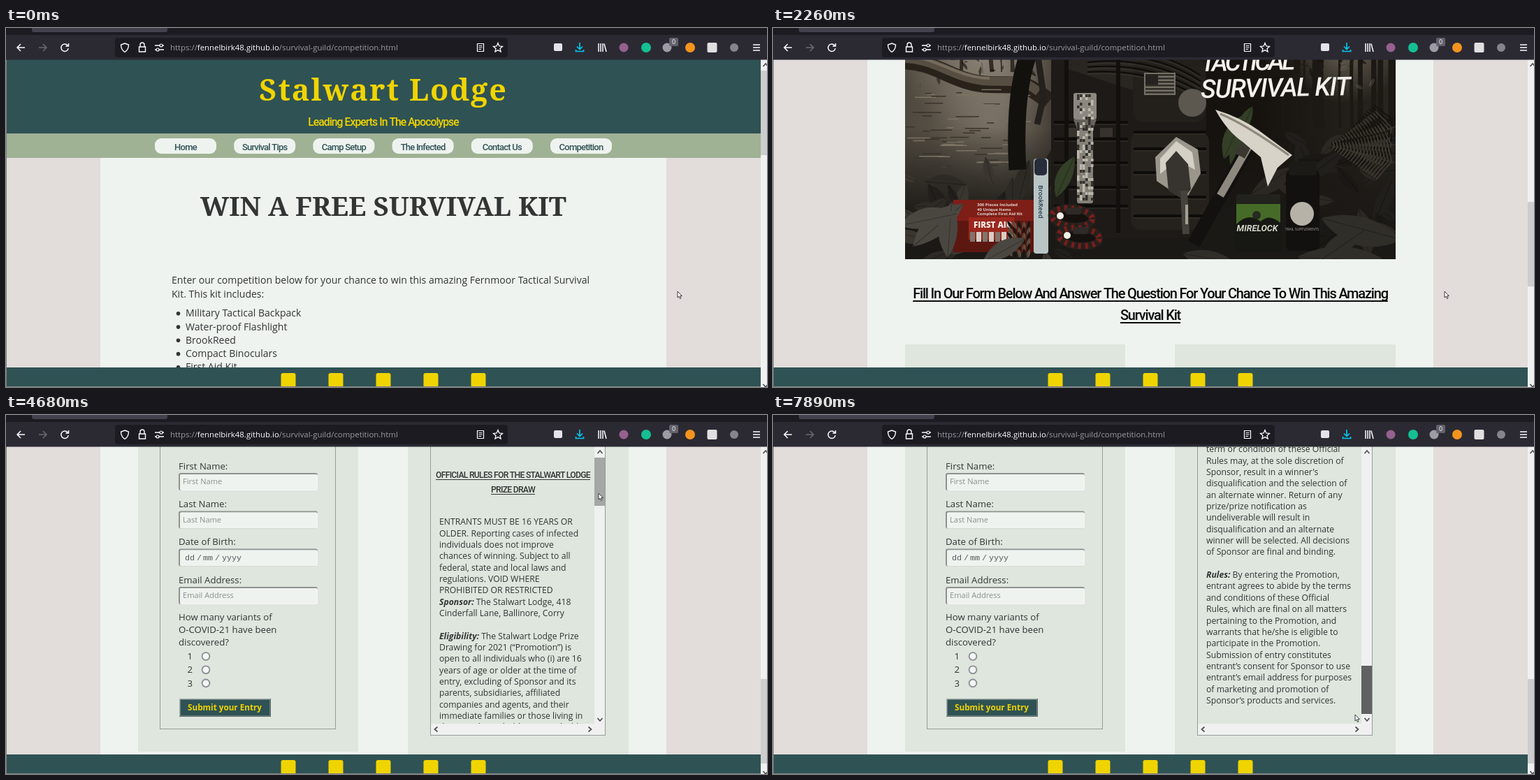
An HTML page with a canvas that plays this animation: 1089x514 px, repeating every 8000 ms.

```html
<!DOCTYPE html>
<html lang="en">
<head>
<meta charset="utf-8">
<title>Competition page</title>
<style>
html, body { margin: 0; width: 100%; height: 100%; overflow: hidden; background: #eef3f0; }
canvas { display: block; width: 1089px; height: 514px; }
</style>
</head>
<body>
<canvas id="stage" width="1089" height="514"></canvas>
<script>
const ctx = document.getElementById('stage').getContext('2d');
const LOOP = 8000, MAX_SCROLL = 1125;
const TEAL = '#2f5254', GOLD = '#f0d400', PAPER = '#eef3f0', CARD = '#dee6dd', INK = '#323534';
const SANS = '"Open Sans", "Noto Sans", sans-serif';
const NARROW = 'Roboto, "Liberation Sans", sans-serif';
const SLAB = '"Noto Serif", "Liberation Serif", serif';
const MONO = '"Liberation Mono", monospace';

const TICKS = [0, 1010, 1130, 1250, 1370, 1490, 1610, 1730, 2010, 2130, 2260, 2400, 2550, 2700, 2820,
  2940, 3090, 3210, 3360, 3760, 3900, 4020, 4170, 4290, 4410, 4530, 4680, 4960, 5240, 5530, 5660, 5790,
  5940, 6070, 6200, 6330, 6460, 6590, 6720, 6850, 6980, 7110, 7240, 7370, 7500, 7630, 7760, 7890];
const SCROLL = [[900, 0], [1490, 336], [1610, 384], [1730, 400], [2010, 458], [2260, 667], [2940, 1070],
  [3090, 1101], [3210, 1116], [3360, MAX_SCROLL]];
const THUMB = [[5400, 0], [5530, 6], [5790, 24], [6720, 156], [7630, 298]];
const POINTER = [[3360, 961, 377], [3760, 949, 327], [4020, 851, 163], [4290, 838, 112], [4530, 848, 112],
  [4960, 847, 111], [5240, 848, 112], [5530, 849, 118], [5790, 852, 138], [6720, 847, 281],
  [7630, 833, 417], [7890, 833, 429]];

function at(track, t, i = 1) {
  if (t <= track[0][0]) return track[0][i];
  for (let k = 1; k < track.length; k++) {
    const a = track[k - 1], b = track[k];
    if (t <= b[0]) return a[i] + (b[i] - a[i]) * (t - a[0]) / (b[0] - a[0]);
  }
  return track[track.length - 1][i];
}

function rect(x, y, w, h, color, r = 0) {
  ctx.fillStyle = color;
  ctx.beginPath();
  ctx.roundRect(x, y, w, h, r);
  ctx.fill();
}
function dot(x, y, r, color) {
  ctx.fillStyle = color;
  ctx.beginPath();
  ctx.arc(x, y, r, 0, 7);
  ctx.fill();
}
function fill(d, color) {
  ctx.fillStyle = color;
  ctx.fill(new Path2D(d));
}
function line(d, color, w = 1.4) {
  ctx.strokeStyle = color;
  ctx.lineWidth = w;
  ctx.stroke(new Path2D(d));
}
// y is the middle of the capitals; returns the advance width
function text(s, x, y, size, color, o = {}) {
  ctx.font = `${o.style || ''} ${o.weight || 400} ${size}px ${o.family || SANS}`;
  ctx.letterSpacing = (o.spacing || 0) * size + 'px';
  ctx.textAlign = o.align || 'left';
  ctx.fillStyle = color;
  ctx.fillText(s, x, y + size * 0.36);
  return ctx.measureText(s).width;
}
function narrow(s, x, y, size, color, underline) {
  const w = text(s, x, y, size, color, { family: NARROW, weight: 500, spacing: -0.06, align: 'center' });
  if (underline) rect(x - w / 2, Math.round(y + size * 0.5), w, underline, color);
}
function chevron(x, y, dx, dy, color = '#505050') {
  const s = 3.5;
  line(`M${x - dy * s - dx * 2} ${y - dx * s - dy * 2} L${x + dx * 2} ${y + dy * 2} ` +
    `L${x + dy * s - dx * 2} ${y + dx * s - dy * 2}`, color, 1.7);
}
// Runs draw with the origin moved and turned
function placed(x, y, turn, draw) {
  ctx.save();
  ctx.translate(x, y);
  ctx.rotate(turn);
  draw();
  ctx.restore();
}
function inside(x, y, w, h, draw) {
  ctx.save();
  ctx.beginPath();
  ctx.rect(x, y, w, h);
  ctx.clip();
  draw();
  ctx.restore();
}
function seeded(n) {
  return () => (n = (n * 16807) % 2147483647) / 2147483647;
}

function toolbar() {
  const pale = '#fbfbfe', dim = '#6a6973';
  rect(0, 0, 1089, 10, '#1c1b22');
  rect(37, -4, 194, 10, '#42414d', 3);
  rect(0, 10, 1089, 35, '#2b2a33');
  rect(0, 45, 1089, 1, 'rgba(43,42,51,.5)');
  rect(156, 14, 562, 28, '#1c1b22', 4);
  line('M27 28H16M21 23L16 28L21 33', pale, 1.5);
  line('M47 28H58M53 23L58 28L53 33', dim, 1.5);
  line('M88.5 25.5A5.2 5.2 0 1 0 89.2 29M89.5 22V26H85.5', pale, 1.5);
  line('M170 22L175.5 24C175.5 29 174 32 170 34.5C166 32 164.5 29 164.5 24Z', pale);
  line('M190.5 27H199.5V34H190.5ZM192 27V24A3 3 0 0 1 198 24V27', pale);
  line('M213 25H220M224 25H226M213 31H215M219 31H226', pale);
  line('M220 25a2 2 0 1 0 4 0a2 2 0 1 0-4 0M215 31a2 2 0 1 0 4 0a2 2 0 1 0-4 0', pale, 1.2);
  let x = 235;
  for (const [s, c] of [['https://', '#9b9aa3'], ['fennelbirk48.github.io', pale],
    ['/survival-guild/competition.html', '#9b9aa3']]) x += text(s, x, 28, 11.4, c);
  line('M674.5 22.5H683.5V33.5H674.5ZM676.5 25.5H681.5M676.5 28H681.5M676.5 30.5H680', pale, 1.2);
  line('M704 21.5L705.9 26L710.5 26.4L707 29.5L708.1 34L704 31.6L699.9 34L701 29.5L697.5 26.4L702.1 26Z', pale, 1.3);
  rect(784, 22, 12, 11, '#e4e3ea', 2);
  line('M821 21V30M817 26.5L821 30.5L825 26.5M815.5 31V33.5H826.5V31', '#00c8ee', 1.7);
  line('M848 22V34M851 22V34M854 22V34M856 22.5L859 34', pale, 1.5);
  dot(884, 28, 6.5, '#96608f');
  dot(916, 28, 7, '#15bf93');
  dot(946, 28, 6.5, '#9d9ca5');
  rect(949, 14, 13, 12, '#62616c', 2);
  text('0', 955.5, 20, 9, '#fff', { align: 'center' });
  dot(979, 28, 7, '#f4941f');
  rect(1003.5, 21, 14, 14, '#e2dfe0', 2);
  dot(1042, 28, 6, '#85848c');
  line('M1069 24H1079M1069 28H1079M1069 32H1079', pale, 1.4);
}

function header() {
  rect(0, 45, 1080, 106, TEAL);
  text('Stalwart Lodge', 540, 89, 43, GOLD, { family: SLAB, weight: 700, spacing: 0.045, align: 'center' });
  narrow('Leading Experts In The Apocolypse', 540, 134, 15.7, GOLD);
  rect(0, 151, 1080, 35, '#9fb294');
  ['Home', 'Survival Tips', 'Camp Setup', 'The Infected', 'Contact Us', 'Competition'].forEach((s, i) => {
    const x = 213 + i * 113.2;
    rect(x, 158, 88, 22, PAPER, 9);
    narrow(s, x + 44, 170, 13, TEAL);
  });
}

const ITEMS = ['Military Tactical Backpack', 'Water-proof Flashlight', 'BrookReed', 'Compact Binoculars',
  'First Aid Kit', 'Survival Shovel with 32 different tools', 'Survival Axe',
  'Two Paracord Survival Bracelets', 'Canteen', 'Camping Cook Set'];

function intro() {
  text('WIN A FREE SURVIVAL KIT', 540, 255, 38.5, INK, { family: SLAB, weight: 700, align: 'center' });
  text('Enter our competition below for your chance to win this amazing Fernmoor Tactical Survival', 237, 361, 14.05, INK);
  text('Kit. This kit includes:', 237, 380.5, 14.05, INK);
  ITEMS.forEach((s, i) => {
    const y = 408.3 + i * 19.28;
    dot(246.5, y + 0.5, 2.8, INK);
    text(s, 257, y, 14.05, INK);
  });
}

function leaf(x, y, len, turn, color) {
  placed(x, y, turn, () => {
    fill(`M0 0Q${len / 2} ${-len * 0.4} ${len} 0Q${len / 2} ${len * 0.28} 0 0`, color);
    line(`M0 0L${len} 0`, 'rgba(0,0,0,.3)', 1);
  });
}
function fern(x, y, len, turn, color) {
  placed(x, y, turn, () => {
    line(`M0 0H${len}`, color, 1.2);
    for (let i = 6; i < len; i += 5) {
      const h = (len - i) * 0.3 + 3;
      line(`M${i} 0l${h * 0.5} ${-h}M${i} 0l${h * 0.5} ${h}`, color, 1.8);
    }
  });
}
function glow(x, y, r, rgb, alpha) {
  const g = ctx.createRadialGradient(x, y, 5, x, y, r);
  g.addColorStop(0, `rgba(${rgb},${alpha})`);
  g.addColorStop(1, `rgba(${rgb},0)`);
  ctx.fillStyle = g;
  ctx.fillRect(x - r, y - r, r * 2, r * 2);
}

function forest(rnd) {
  const bg = ctx.createLinearGradient(189, 0, 891, 0);
  [[0, '#4f493f'], [0.2, '#625b50'], [0.34, '#38332c'], [0.43, '#13110e'], [0.72, '#16130f'], [1, '#29251f']]
    .forEach(([p, c]) => bg.addColorStop(p, c));
  ctx.fillStyle = bg;
  ctx.fillRect(189, 0, 702, 368);
  glow(300, 70, 120, '166,157,143', 0.6);
  glow(310, 170, 90, '140,131,117', 0.45);
  glow(820, 55, 90, '132,123,108', 0.75);

  // trunks on both sides, then broken foliage
  for (let i = 0; i < 15; i++) {
    const x = 735 + rnd() * 155, lean = rnd() * 24 - 12;
    line(`M${x} -5Q${x + lean} 70 ${x + lean / 2} 180`, '#1c1813', 2 + rnd() * 9);
  }
  for (let i = 0; i < 11; i++) {
    const x = 205 + rnd() * 200;
    line(`M${x} -5L${x + rnd() * 20 - 10} 100`, '#332d26', 1 + rnd() * 5);
  }
  for (let i = 0; i < 320; i++) {
    const right = i % 2, x = right ? 700 + rnd() * 191 : 189 + rnd() * 210;
    const tone = ['rgba(24,21,17,.6)', 'rgba(126,117,103,.35)', 'rgba(42,37,31,.6)'][i % 3];
    leaf(x, rnd() * rnd() * 150, 5 + rnd() * 12, rnd() * 6, tone);
  }
  [[189, 40, 75, 0.15], [195, 15, 95, 0.35], [189, 70, 65, -0.25], [235, 0, 70, 0.9]].forEach(a => fern(...a, '#857c6d'));
  line('M183 84C235 84 260 117 310 118S360 114 395 142', '#28221b', 24);
  line('M183 80C235 80 260 112 310 113S355 110 380 128', '#574e42', 13);
  line('M183 77C235 77 260 108 310 109', '#776c5d', 4);

  const ground = ctx.createLinearGradient(0, 180, 0, 310);
  ground.addColorStop(0, 'rgba(24,22,18,0)');
  ground.addColorStop(1, '#1b1916');
  ctx.fillStyle = ground;
  ctx.fillRect(189, 180, 702, 188);
  for (let i = 0; i < 60; i++)
    line(`M${189 + rnd() * 150} ${125 + rnd() * 110}h${8 + rnd() * 30}`, ['#39332b', '#7b7263'][i % 2], 1.5);
  for (let i = 0; i < 34; i++) leaf(185 + rnd() * 230, 255 + rnd() * 105, 25 + rnd() * 45, rnd() * 6, ['#2d2a25', '#3a362f', '#211f1b'][i % 3]);
  for (let i = 0; i < 34; i++) leaf(725 + rnd() * 170, 180 + rnd() * 180, 30 + rnd() * 50, rnd() * 6, ['#211f1b', '#1a1815', '#2b2823'][i % 3]);
  for (let i = 0; i < 6; i++) fern(891, 165 + i * 13, 95, 2.7 + i * 0.14, i % 2 ? '#3d382f' : '#14120f');
}

function backpack() {
  line('M350 240C345 150 355 70 385 45Q410 28 440 50', '#12110e', 25);
  line('M480 55Q500 18 545 35L560 60', '#151310', 9);
  line('M378 70L388 140M386 140L378 175', '#24211d', 9);
  rect(398, 52, 222, 286, '#1d1a17', 34);
  fill('M430 60Q500 25 590 65L618 130V160L420 95Z', '#292520');
  rect(515, 82, 104, 90, '#23201b', 16);
  rect(512, 186, 112, 140, '#25221d', 14);
  for (let i = 0; i < 5; i++) {
    line(`M450 ${72 + i * 7}Q540 ${58 + i * 9} 612 ${105 + i * 8}`, '#0c0b09', 2);
    line(`M450 ${75 + i * 7}Q540 ${61 + i * 9} 612 ${108 + i * 8}`, '#3b362e', 1);
  }
  for (const y of [172, 196, 230, 265, 292]) {
    line(`M402 ${y}H508M516 ${y + 14}H620`, '#0d0c0a', 4);
    line(`M402 ${y + 3}H508M516 ${y + 17}H620`, '#38332c', 1);
  }
  rect(420, 180, 18, 13, '#37332c');
  rect(468, 180, 18, 13, '#37332c');
  line('M420 52V330M494 60V330', '#11100d', 6);
  rect(531, 101, 45, 32, '#756f65');
  for (let i = 0; i < 6; i++) rect(533, 103 + i * 5, 41, 2.4, '#2f2c28');
  rect(533, 103, 18, 15, '#25221f');
  dot(600, 144, 20, '#5c5850');
}

// Artwork of the kit, y from 0 to 368
function banner() {
  const rnd = seeded(77);
  forest(rnd);
  backpack();

  // grass, torch
  for (const [x, y, l] of [[645, 225, 70], [655, 235, 55], [405, 280, 65], [668, 190, 45]]) leaf(x, y, l, -1.15, '#333f27');
  rect(430, 130, 33, 38, '#8c887f', 3);
  fill('M430 168H463L457 184H436Z', '#67635b');
  rect(435, 182, 23, 106, '#858178', 3);
  for (let i = 0; i < 150; i++) rect(435 + Math.floor(rnd() * 6) * 4, 132 + Math.floor(rnd() * 38) * 4, 3.5, 4, i % 2 ? '#35322d' : '#bdb8ae');

  // shovel, axe
  fill('M577 193L608 211L612 245L594 277H580L549 256L547 222Z', '#9b968b');
  fill('M577 199L600 215L604 240L578 226L554 246L554 224Z', '#d4d0c6');
  fill('M577 213L594 232L598 268L586 282L566 270L562 230Z', '#37342f');
  line('M588 270L591 332', '#45423c', 10);
  line('M592 290V318', '#a49f94', 4);
  line('M692 186L602 346', '#12110f', 19);
  line('M682 204L640 277', '#8e897f', 11);
  line('M690 180L668 220', '#3a3731', 16);
  fill('M633 154Q670 165 697 185L743 219L722 237L708 264L698 222L672 200Q650 185 633 154Z', '#d8d3c9');
  line('M640 160Q675 174 738 219', '#8d877c', 3);

  // first aid box, straw, pine cone
  rect(258, 283, 115, 75, '#5d1711');
  rect(258, 283, 115, 30, '#7d1e17');
  ['300 Pieces Included', '40 Unique Items', 'Complete First Aid Kit'].forEach((s, i) =>
    text(s, 292, 290 + i * 6.6, 6, '#e4d7cf', { weight: 700 }));
  rect(280, 308, 65, 32, '#9c271e');
  text('FIRST AID', 287, 319, 11.5, '#f2ebe5', { weight: 800 });
  for (let i = 0; i < 7; i++) rect(282 + i * 9, 329, 7, 14, i % 2 ? '#d7cec4' : '#7f756a');
  rect(373, 224, 21, 136, '#b8c5c4', 4);
  rect(374, 224, 18, 24, '#272d3b', 5);
  placed(383, 262, Math.PI / 2, () => text('BrookReed', 0, 0, 9, '#26384d', { weight: 600 }));
  for (let r = 0; r < 6; r++) for (let c = 0; c < 5; c++)
    leaf(335 + c * 8, 313 + r * 8, 14, 1 + c * 0.2, (r + c) % 2 ? '#6a5543' : '#1e1813');

  // bracelets
  for (const [x, y] of [[428, 308], [438, 336]]) {
    ctx.beginPath();
    ctx.ellipse(x, y, 29, 13, 0.1, 0, 7);
    ctx.fillStyle = '#15110f';
    ctx.fill();
    ctx.lineWidth = 11;
    ctx.strokeStyle = '#26201d';
    ctx.stroke();
    ctx.setLineDash([4, 6]);
    ctx.lineWidth = 8;
    ctx.strokeStyle = '#7a1d19';
    ctx.stroke();
    ctx.setLineDash([]);
    rect(x - 9, y - 14, 22, 10, '#2e2a27', 3);
    dot(x - 17, y - 2, 5, '#f4efe4');
  }

  // jar, flask
  rect(659, 286, 69, 72, '#171813', 8);
  rect(663, 275, 63, 16, '#22231d', 4);
  fill('M663 289H726V316Q710 302 698 314Q680 300 663 318Z', '#466b28');
  dot(692, 305, 6, '#262a20');
  text('MIRELOCK', 693, 323, 12.5, '#d4d5c6', { family: NARROW, weight: 700, style: 'italic', align: 'center' });
  rect(734, 240, 48, 116, '#12110f', 8);
  rect(738, 228, 40, 20, '#1b1a17', 4);
  dot(757, 303, 17, '#b7b2a8');
  text('TRAIL SUPPLEMENTS', 757, 325, 5, '#aaa59b', { align: 'center' });

  [[200, 350, 95, -0.7], [250, 366, 80, -1.5], [180, 320, 85, -0.2], [300, 372, 70, -0.5]].forEach(a => leaf(...a, '#4a4740'));
  [[900, 340, 120, 3.4], [880, 372, 130, 3.2], [780, 372, 80, -0.6], [660, 372, 75, 3.3]].forEach(a => leaf(...a, '#302e29'));

  const brush = { family: NARROW, style: 'italic', weight: 500 };
  text('ENTER TO WIN', 615, 51, 19, '#66b52f', brush);
  placed(612, 86, -0.02, () => text('TACTICAL', 0, 0, 36, '#f3f1ec', { ...brush, spacing: -0.1 }));
  placed(612, 124, -0.02, () => text('SURVIVAL KIT', 0, 0, 37, '#f3f1ec', { ...brush, spacing: -0.035 }));
}

function field(label, hint, y) {
  text(label, 247, y - 10, 13.2, INK);
  rect(247, y, 199, 25, '#8d9390', 3);
  rect(249, y + 2, 197, 23, '#f5f8f6', 2);
  rect(249, y + 2, 196, 22, PAPER, 2);
  text(hint, 253, y + 12.5, 11.1, '#8b908e');
}

function outline(x, y, w, h) {
  ctx.strokeStyle = '#979c98';
  ctx.lineWidth = 1;
  ctx.strokeRect(x + 0.5, y + 0.5, w, h);
}

function form() {
  rect(189, -5, 315, 487, CARD);
  outline(220, 44, 251, 405);
  field('First Name:', 'First Name', 83);
  field('Last Name:', 'Last Name', 137.5);
  field('Date of Birth:', '', 191.5);
  [['dd', 256], ['/', 273], ['mm', 282], ['/', 299], ['yyyy', 309]].forEach(([s, x]) =>
    text(s, x, 204, 11.7, '#55595a', { family: MONO }));
  field('Email Address:', 'Email Address', 246);
  ['How many variants of', 'O-COVID-21 have been', 'discovered?'].forEach((s, i) =>
    text(s, 247, 289.5 + i * 18, 13.2, INK));
  for (let i = 0; i < 3; i++) {
    const y = 345.5 + i * 19.2;
    text(i + 1, 259.5, y, 13.2, INK);
    dot(286, y, 6.3, '#8b8c95');
    dot(286, y, 4.5, '#f4f6f5');
  }
  rect(248, 406, 131, 26, '#5d6566');
  rect(248, 406, 130, 25, '#a5adab');
  rect(249.5, 407.5, 128, 23, TEAL);
  text('Submit your Entry', 313, 419, 11.7, GOLD, { weight: 700, align: 'center' });
}

// Text before a bar is emphasised.
const RULES = `ENTRANTS MUST BE 16 YEARS OR
OLDER. Reporting cases of infected
individuals does not improve
chances of winning. Subject to all
federal, state and local laws and
regulations. VOID WHERE
PROHIBITED OR RESTRICTED
Sponsor:| The Stalwart Lodge, 418
Cinderfall Lane, Ballinore, Corry

Eligibility:| The Stalwart Lodge Prize
Drawing for 2021 (“Promotion”) is
open to all individuals who (i) are 16
years of age or older at the time of
entry, excluding of Sponsor and its
parents, subsidiaries, affiliated
companies and agents, and their
immediate families or those living in
the same household, are not eligible
to enter.

Promotion Period:| Entrants may
participate in the Promotion
between 00:01am GMT on August 1,
2021 through 23:01AM GMT on
December 31, 2021 (“Promotion
Period”). Sponsor’s computer is the
official time-keeping device for the
Promotion.

Release:| By entering, each entrant
agrees to release and hold harmless
the Sponsor, its parents, affiliates,
directors, officers, employees and
agents, and all other parties involved
in the Promotion, from and against
any claim or cause of action arising
out of participation in it or receipt
or use of any prize (COLLECTIVELY,
THE “RELEASED PARTIES”), WHO ARE
NOT RESPONSIBLE FOR ANY AND ALL
CLAIMS, ACTIONS, INJURIES,
LOSSES, LIABILITIES, OR DAMAGES
OF ANY KIND (INCLUDING, WITHOUT
LIMITATION, PERSONAL INJURY,
DEATH, DAMAGE TO OR
DESTRUCTION OF PROPERTY,
RIGHTS OF PUBLICITY OR PRIVACY,
DEFAMATION OR PORTRAYAL IN A
FALSE LIGHT) ARISING OUT OF OR IN
CONNECTION WITH THE
PROMOTION OR THE ACCEPTANCE,
POSSESSION, OR USE OF THE PRIZE,
WHETHER UNDER A THEORY OF
CONTRACT, WARRANTY, TORT
(INCLUDING, WITHOUT LIMITATION,
NEGLIGENCE, WHETHER ACTIVE,
PASSIVE, OR IMPUTED), STRICT
LIABILITY, PRODUCT LIABILITY,
CONTRIBUTION, OR ANY OTHER
THEORY, TO THE EXTENT
PERMITTED BY LAW.

Winner Notification and|
Acceptance:| The potential winners
will be notified on or about January
2nd 2022, via email. Winner may
be required to sign and return an
affidavit of eligibility and a liability
release within seven days of the
notification. If a potential winner
cannot be contacted, or fails to
return the documents in time, the
prize is forfeited and an alternate
winner may be chosen. Sponsor
accepts no duty for messages that
are lost, late or misdirected.

Conditions:| The prize cannot be
transferred, exchanged or redeemed
for cash. Sponsor may substitute a
prize of equal or greater value.
Winners are responsible for all
taxes and fees on the prize. Failure
by an entrant to comply with any
other requirement, request,
term or condition of these Official
Rules may, at the sole discretion of
Sponsor, result in a winner's
disqualification and the selection of
an alternate winner. Return of any
prize/prize notification as
undeliverable will result in
disqualification and an alternate
winner will be selected. All decisions
of Sponsor are final and binding.

Rules:| By entering the Promotion,
entrant agrees to abide by the terms
and conditions of these Official
Rules, which are final on all matters
pertaining to the Promotion, and
warrants that he/she is eligible to
participate in the Promotion.
Submission of entry constitutes
entrant’s consent for Sponsor to use
entrant’s email address for purposes
of marketing and promotion of
Sponsor’s products and services.`.split('\n');

function rules(thumb, thumbColor) {
  rect(575, -5, 316, 496, CARD);
  outline(607, 44, 250, 414);
  inside(608, 45, 234, 397.5, () => {
    ctx.translate(0, -Math.round(thumb * 1510 / 298));
    narrow('OFFICIAL RULES FOR THE STALWART LODGE', 725.5, 86, 12.2, INK, 1);
    narrow('PRIZE DRAW', 725.5, 107, 12.2, INK, 1);
    RULES.forEach((s, i) => {
      const y = 152.8 + i * 16.35, bar = s.indexOf('|');
      const lead = bar < 0 ? 0 : text(s.slice(0, bar), 620, y, 12.2, INK, { style: 'italic', weight: 700 });
      text(s.slice(bar + 1), 620 + lead, y, 12.2, INK);
    });
  });
  rect(842, 45, 15, 397, '#f0f0f0');
  rect(608, 442, 249, 16, '#f0f0f0');
  rect(842, 61 + thumb, 15, 69, thumbColor);
  chevron(850, 53, 0, -1);
  chevron(850, 436, 0, 1);
  chevron(615.5, 450, -1, 0);
  chevron(835.5, 450, 1, 0);
}

function pointer(x, y) {
  placed(x, y, 0, () => {
    const arrow = 'M0 0V9L2 7.2L3.5 10.5L5 9.8L3.6 6.6H6.4Z';
    fill(arrow, '#fff');
    line(arrow, '#2a2a2e', 0.9);
  });
}

function draw(t) {
  const scroll = at(SCROLL, t), thumb = Math.round(at(THUMB, t));
  rect(0, 45, 1089, 469, '#e2dcdb');
  rect(135, 45, 810, 469, PAPER);
  placed(0, -Math.round(scroll), 0, () => {
    header();
    intro();
    narrow('Fill In Our Form Below And Answer The Question For Your Chance To Win This Amazing', 540, 1047, 20, '#0b0b0b', 2);
    narrow('Survival Kit', 540, 1078, 20, '#0b0b0b', 2);
    placed(0, 630, 0, () => inside(189, 0, 702, 368, banner));
    placed(0, MAX_SCROLL, 0, () => {
      form();
      rules(thumb, t < 4170 ? '#cdcdcd' : t < 5240 ? '#a6a6a6' : '#606060');
    });
  });
  rect(0, 486, 1080, 28, TEAL);
  for (let i = 0; i < 5; i++) rect(393.5 + i * 68, 494, 21, 21, GOLD, 3);
  rect(0, 45, 1, 469, '#7d8283');
  rect(0, 513, 1080, 1, '#7d8283');
  rect(1080, 45, 9, 469, '#f0f0f0');
  rect(1080, 61 + Math.round(scroll * 0.2813) + (t >= 4170 ? 1 : 0), 9, 121, '#cdcdcd');
  chevron(1087, 53, 0, -1);
  chevron(1087, 512, 0, 1);
  toolbar();
  pointer(Math.round(at(POINTER, t, 1)), Math.round(at(POINTER, t, 2)));
}

const start = performance.now();
function frame(now) {
  const t = Math.max(0, now - start) % LOOP;
  draw(TICKS.findLast(k => k <= t));
  requestAnimationFrame(frame);
}
requestAnimationFrame(frame);
</script>
</body>
</html>
```
